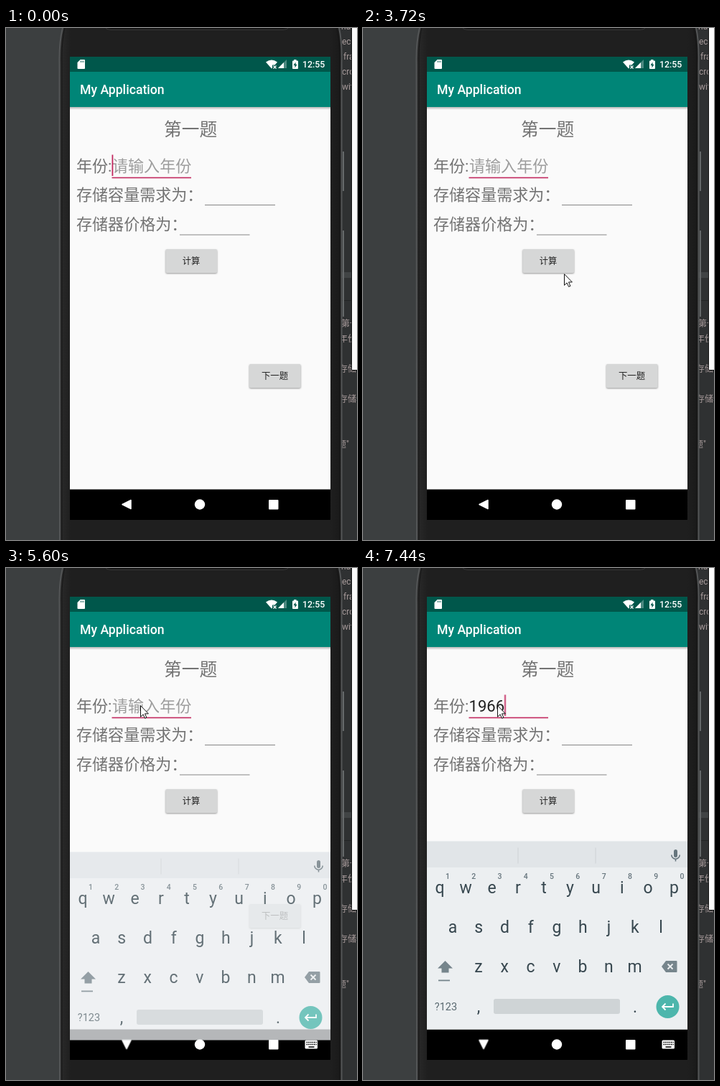
Animation, 489 px wide and 713 px high, one loop 7990 ms. Source, as an HTML page:

```html
<!DOCTYPE html>
<html lang="zh-CN">
<head>
<meta charset="utf-8">
<title>My Application</title>
<style>
html, body { margin: 0; width: 100%; height: 100%; overflow: hidden; background: #3c3f40; }
svg { display: block; width: 489px; height: 713px; }
text { font-family: Roboto, "Noto Sans CJK SC", "Noto Sans CJK", sans-serif; }
.label { font-size: 22.05px; fill: #737373; }
.btn text { font-size: 12.35px; fill: #222; text-anchor: middle; }
.btn rect { fill: #d6d7d7; filter: drop-shadow(0 1px 1px #0006); }
.code { font-size: 12px; fill: #a99c9c; }
.key { font-size: 23px; fill: #37474f; text-anchor: middle; }
.num { font-size: 10.5px; font-weight: 500; fill: #66757d; text-anchor: middle; }

#hint, #typed, #caret, #blink, #ime, #back, #imeIcon, #mouse {
  animation: 7.99s step-end infinite;
}
#hint { fill: #9d9d9d; animation-name: hint; }
#typed { animation-name: type; }
#caret { animation-name: advance; }
#blink { animation-name: blink; }
#ime { animation-name: rise; }
#back { transform-origin: 168px 663.5px; animation-name: flip; }
#imeIcon { animation-name: icon; }
#mouse { animation-name: mouse; }

@keyframes hint {
  64.95% { fill: #757575; }
  67.08% { fill: #9d9d9d; opacity: 1; }
  82.6% { opacity: 0; }
}
@keyframes type {
  0% { clip-path: inset(0 100% 0 0); }
  82.6% { clip-path: inset(0 75% 0 0); }
  85.48% { clip-path: inset(0 50% 0 0); }
  91.23% { clip-path: inset(0 25% 0 0); }
  93.11% { clip-path: inset(0 0 0 0); }
}
@keyframes advance {
  0% { transform: none; }
  82.6% { transform: translateX(12.4px); }
  85.48% { transform: translateX(24.8px); }
  91.23% { transform: translateX(37.2px); }
  93.11% { transform: translateX(49.6px); }
}
@keyframes blink {
  0%, 12.39%, 24.03%, 36.79%, 50.5%, 63.07%, 74.84%, 82.6% { opacity: 1; }
  6.53%, 18.14%, 30.91%, 43.55%, 56.32%, 68.96%, 80.47% { opacity: 0; }
}
@keyframes rise {
  0% { transform: translateY(28px); opacity: 0; }
  68.96% { transform: translateY(28px); opacity: .35; }
  70.08% { transform: translateY(15px); opacity: .77; }
  70.83% { transform: translateY(5px); opacity: .95; }
  71.83% { transform: none; opacity: 1; }
}
@keyframes flip {
  0% { transform: none; }
  68.96% { transform: rotate(-90deg); }
}
@keyframes icon {
  0% { opacity: 0; }
  68.96% { opacity: 1; }
}
@keyframes mouse {
  0% { transform: translate(405px, 730px); }
  2.62% { transform: translate(405px, 695px); }
  3.6% { transform: translate(389px, 650px); }
  4.58% { transform: translate(374px, 607px); }
  5.55% { transform: translate(360px, 566px); }
  6.53% { transform: translate(346px, 526px); }
  7.5% { transform: translate(333px, 488px); }
  8.48% { transform: translate(320px, 453px); }
  9.46% { transform: translate(308px, 420px); }
  10.43% { transform: translate(298px, 390px); }
  11.38% { transform: translate(288px, 363px); }
  12.39% { transform: translate(283px, 347px); }
  45.68% { transform: translate(280px, 342px); }
  46.64% { transform: translate(274px, 329px); }
  47.6% { transform: translate(265px, 312px); }
  48.57% { transform: translate(254px, 291px); }
  49.53% { transform: translate(241px, 266px); }
  50.5% { transform: translate(228px, 241px); }
  51.46% { transform: translate(216px, 219px); }
  52.42% { transform: translate(206px, 199px); }
  53.39% { transform: translate(198px, 185px); }
  54.35% { transform: translate(194px, 176px); }
  55.31% { transform: translate(191px, 171px); }
  58.19% { transform: translate(190px, 175px); }
  59.19% { transform: translate(189px, 180px); }
  62.07% { transform: translate(188px, 186px); }
  63.07% { transform: translate(187px, 191px); }
}
</style>
</head>
<body>
<svg viewBox="0 0 489 713">
  <defs>
    <linearGradient id="shade" x2="0" y2="1">
      <stop stop-color="#000" stop-opacity=".28"/>
      <stop offset="1" stop-color="#000" stop-opacity="0"/>
    </linearGradient>
    <linearGradient id="body">
      <stop stop-color="#2b2b2b"/>
      <stop offset=".04" stop-color="#1f1f1f"/>
      <stop offset=".96" stop-color="#1f1f1f"/>
      <stop offset="1" stop-color="#191919"/>
    </linearGradient>
  </defs>

  <!-- desktop and editor behind the phone -->
  <rect width="489" height="713" fill="#3c3f40"/>
  <rect x="460" width="29" height="713" fill="#2f3132"/>
  <rect x="460" y="340" width="29" height="8" fill="#414445"/>
  <path d="M460 379.5h29" stroke="#232525"/>
  <path d="M470 172v55M470 282v120" stroke="#66696a" stroke-width="2"/>
  <g class="code">
    <text x="467" y="2">na</text>
    <text x="468" y="23">ec</text>
    <text x="470" y="44">fra</text>
    <text x="468" y="65">cro</text>
    <text x="468" y="86">wit</text>
    <text x="467" y="416">第一</text>
    <text x="464" y="437">年份</text>
    <text x="464" y="479">存储</text>
    <text x="464" y="521">存储器</text>
    <text x="462" y="584">题"</text>
  </g>
  <path d="M481.5 -1V476.5H490V-1Z" fill="#fafafa" stroke="#111"/>

  <!-- phone -->
  <path d="M80 -4C76 10 74 28 74.500 50L75 716H467.500V50C468 28 467 10 463 -4Z" fill="url(#body)" stroke="#545657" stroke-width="2"/>
  <path d="M78 716V50C77.500 28 79 12 82 0M464.500 716V50C465 28 463.500 12 460.500 0" fill="none" stroke="#161616"/>
  <path d="M138 -1Q140 2.500 146 2.500H386Q392 2.500 394 -1" fill="#151515" stroke="#3a3a3a"/>

  <rect x="89" y="40" width="363" height="645" fill="#fafafa"/>
  <rect x="89" y="110" width="363" height="4" fill="url(#shade)"/>
  <rect x="89" y="61" width="363" height="49" fill="#008577"/>
  <rect x="89" y="40" width="363" height="21" fill="#00574b"/>
  <rect x="89" y="642.500" width="363" height="42.500" fill="#000"/>

  <!-- status bar -->
  <g fill="#fff">
    <path d="M103.500 44H109Q110 44 110 45V56Q110 57 109 57H100.500Q99.500 57 99.500 56V48Z"/>
    <path d="M362 47.500Q370 41.500 378 47.500L374.500 51.500H371V55.500L370 56.500Z"/>
    <path d="M372.500 52.500l4 4m0-4l-4 4" stroke="#fff" stroke-width="1.200"/>
    <path d="M391 44V56H379Z" opacity=".3"/>
    <path d="M387 48V56H379Z"/>
    <path d="M401 45.500V44H404.500V45.500H406Q407 45.500 407 46.500V56Q407 57 406 57H400Q399 57 399 56V46.500Q399 45.500 400 45.500Z"/>
    <path d="M403.500 47.500L400.500 52H402.500V55.500L405.500 50.800H403.500Z" fill="#00574b"/>
    <text x="413" y="55" font-size="12.350" font-weight="500">12:55</text>
    <text x="103" y="92" font-size="17.650" font-weight="500">My Application</text>
  </g>
  <path d="M104 45.500v2.500M106 45.500v2.500M108 45.500v2.500" stroke="#00574b" stroke-width=".8"/>

  <!-- form -->
  <text x="220" y="150" font-size="24.700" fill="#737373">第一题</text>
  <g class="label">
    <text x="98" y="200">年份:</text>
    <text x="98" y="240">存储容量需求为：</text>
    <text x="98" y="281">存储器价格为：</text>
    <text id="hint" x="148" y="200">请输入年份</text>
  </g>
  <text id="typed" x="147.500" y="200" font-size="22.050" fill="#212121">1966</text>
  <rect x="147.500" y="207.700" width="110.500" height="1.600" fill="#c2285f"/>
  <path d="M277 246.500h98M242 288h97.500" stroke="#858585"/>
  <g id="caret"><rect id="blink" x="147.500" y="176.500" width="1.800" height="29.500" fill="#c2285f"/></g>
  <g class="btn">
    <rect x="222.500" y="308" width="71.500" height="33" rx="1.800"/>
    <text x="258" y="329">计算</text>
    <rect x="339" y="468" width="71.500" height="33" rx="1.800"/>
    <text x="374.500" y="489">下一题</text>
  </g>

  <!-- navigation bar -->
  <g fill="#fff">
    <path id="back" d="M162 663.500L174 657.500V669.500Z" stroke="#fff" stroke-width="1.500" stroke-linejoin="round"/>
    <circle cx="270" cy="663.500" r="7.200"/>
    <rect x="366" y="657" width="13.500" height="13.500" rx="1"/>
    <g id="imeIcon">
      <rect x="416.500" y="657.500" width="17.500" height="12" rx="1.500"/>
      <path d="M418.500 660.500H433M418.500 663.500H433" stroke="#000" stroke-width="1.700" stroke-dasharray="1.700 1"/>
      <path d="M421.500 667h8" stroke="#000" stroke-width="1.500"/>
    </g>
  </g>

  <!-- soft keyboard -->
  <g id="ime">
    <rect x="89" y="380" width="363" height="262.500" fill="#eceff1"/>
    <rect x="89" y="380" width="363" height="37" fill="#e1e5e8"/>
    <path d="M89 380.500h363" stroke="#eceff1"/>
    <path d="M216 389.500v22M324 389.500v22" stroke="#cdd2d5"/>
    <g stroke="#66757d" fill="none">
      <path d="M435.500 394.500v6" stroke-width="5" stroke-linecap="round"/>
      <path d="M429.800 399.500a5.700 5.700 0 0 0 11.400 0M435.500 405v3.500" stroke-width="1.600"/>
    </g>
    <g id="keys"></g>
    <g fill="#76858c">
      <path d="M114.500 547L125 557.500H119.500V563.500H109.500V557.500H104Z"/>
      <rect x="105" y="573.500" width="16" height="1.800"/>
      <path d="M422 547H436.500Q437.500 547 437.500 548V562Q437.500 563 436.500 563H422L416 555Z"/>
    </g>
    <path d="M424.500 551.500l7 7m0-7l-7 7" stroke="#eceff1" stroke-width="1.800"/>
    <text x="115.500" y="616" font-size="14.500" fill="#5a6970" text-anchor="middle">?123</text>
    <text class="key" x="161" y="619">,</text>
    <text class="key" x="379" y="619">.</text>
    <rect x="182" y="600" width="176" height="21" rx="3" fill="#cfd4d6"/>
    <circle cx="424.500" cy="611" r="16" fill="#4db6ac"/>
    <path d="M432 606.500V611H417.500M421.500 606.500L417 611L421.500 615.500" fill="none" stroke="#fff" stroke-width="1.800"/>
  </g>

  <path id="mouse" d="M.5 .7V16.300L4.100 12.900L6.600 18.300L8.900 17.300L6.500 11.900H11.400Z" fill="#fff" stroke="#111"/>
</svg>
<script>
const PITCH = 36.27;

function row(chars, x, y, cls) {
  return [...chars].map((c, i) =>
    `<text class="${cls}" x="${x + i * PITCH}" y="${y}">${c}</text>`).join('');
}

document.getElementById('keys').innerHTML =
  row('qwertyuiop', 107, 453, 'key') +
  row('1234567890', 118, 433, 'num') +
  row('asdfghjkl', 125, 508, 'key') +
  row('zxcvbnm', 161, 563, 'key');
</script>
</body>
</html>
```
